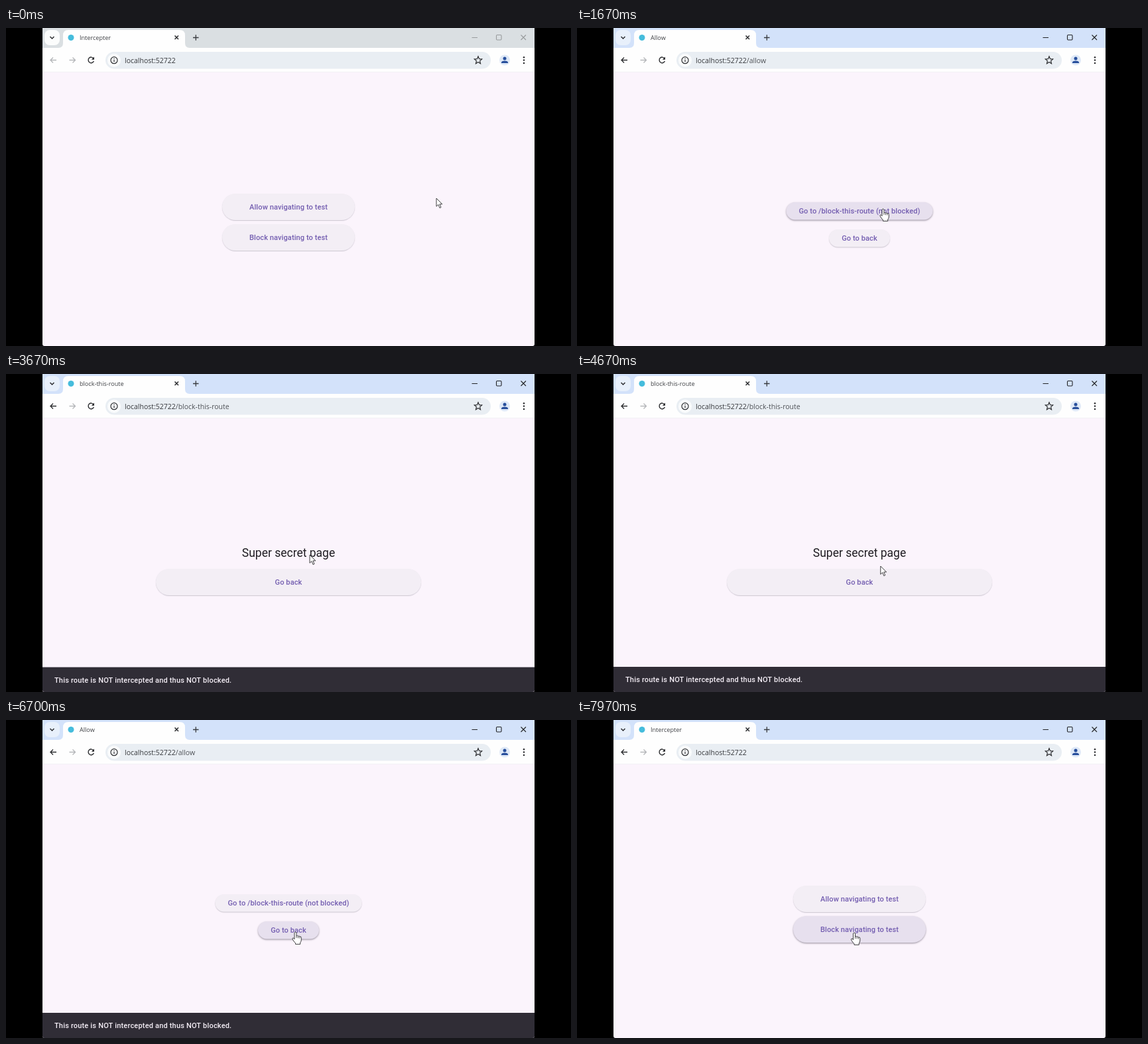
Recreate the animation shown at these times as an HTML page with a canvas. Size 852 by 480 pixels, loop 8000 ms.

```html
<!DOCTYPE html>
<html lang="en">
<head>
<meta charset="utf-8">
<title>Route demo</title>
<style>
html, body { margin: 0; width: 100%; height: 100%; overflow: hidden; background: #000; }
canvas { display: block; width: 852px; height: 480px; }
</style>
</head>
<body>
<canvas id="stage" width="852" height="480"></canvas>
<script>
const ctx = document.getElementById('stage').getContext('2d');
const LOOP = 8000;
const UI = '"Open Sans", "Noto Sans", sans-serif';
const APP = 'Roboto, sans-serif';
const PAPER = '#fbf4fc';
const CHROME = '#fefefe';
const INK = '#2b2c2f';
const FAINT = '#b4b6b9';

// Button: label, x, y, width, height
const pages = {
  home: {
    title: 'Intercepter', path: '',
    buttons: [['Allow navigating to test', 326, 250, 200, 40],
              ['Block navigating to test', 326, 296, 200, 40]]
  },
  allow: {
    title: 'Allow', path: '/allow',
    buttons: [['Go to /block-this-route (not blocked)', 315.5, 263, 221, 26.5],
              ['Go to back', 380, 304, 92, 26.5]]
  },
  secret: {
    title: 'block-this-route', path: '/block-this-route', heading: 'Super secret page',
    buttons: [['Go back', 226, 294, 400, 40]]
  }
};

// Start time, page, scale the page enters from
const visits = [[-1000, 'home', 1], [1000, 'allow', 0.85], [3390, 'secret', 0.85],
                [5900, 'allow', 1.06], [6980, 'home', 1.06]];
const FOCUS_AT = 920;

// Time, x, y of the pointer's hot spot
const path = [[0, 649, 257], [150, 649, 257], [750, 464, 273], [1670, 461.5, 273],
              [2600, 458, 272], [3700, 458, 273], [4300, 458, 274], [5100, 457.5, 310],
              [6000, 457.5, 310], [6600, 436.5, 320], [7200, 436.5, 320],
              [7700, 418, 321], [8000, 418, 321]];

const clamp = v => Math.max(0, Math.min(1, v));
const smooth = v => { v = clamp(v); return v * v * (3 - 2 * v); };
const easeOut = v => 1 - Math.pow(1 - clamp(v), 3);

function visitIndex(t) {
  let i = 0;
  while (i + 1 < visits.length && visits[i + 1][0] <= t) i++;
  return i;
}

function pointer(t) {
  t = Math.max(0, t);
  let i = 0;
  while (i + 2 < path.length && path[i + 1][0] <= t) i++;
  const [t0, x0, y0] = path[i], [t1, x1, y1] = path[i + 1];
  const k = smooth((t - t0) / (t1 - t0));
  return [x0 + (x1 - x0) * k, y0 + (y1 - y0) * k];
}

function hovered(t) {
  const [px, py] = pointer(t);
  return pages[visits[visitIndex(t)][1]].buttons.find(
    ([, x, y, w, h]) => px >= x && px <= x + w && py >= y && py <= y + h);
}

// Hover strength lags behind the pointer
function glow(button, t) {
  let sum = 0;
  for (let k = 0; k < 8; k++) sum += hovered(t - k * 20) === button;
  return sum / 8;
}

function pill(x, y, w, h, r, fill) {
  ctx.beginPath();
  ctx.roundRect(x, y, w, h, r);
  ctx.fillStyle = fill;
  ctx.fill();
}

function disc(x, y, r, fill) {
  ctx.beginPath();
  ctx.arc(x, y, r, 0, 7);
  ctx.fillStyle = fill;
  ctx.fill();
}

function stroke(d, color, width = 1.3) {
  ctx.strokeStyle = color;
  ctx.lineWidth = width;
  ctx.stroke(new Path2D(d));
}

function text(str, x, y, font, color, align = 'left', spacing = 0) {
  ctx.font = font;
  ctx.fillStyle = color;
  ctx.textAlign = align;
  ctx.textBaseline = 'alphabetic';
  ctx.letterSpacing = spacing + 'px';
  ctx.fillText(str, x, y);
}

function mix(a, b, k) {
  return `rgb(${a.map((v, i) => Math.round(v + (b[i] - v) * k))})`;
}

function drawButton(button, t) {
  const [label, x, y, w, h] = button;
  const g = glow(button, t);
  ctx.save();
  ctx.shadowColor = mix([204, 198, 208], [160, 152, 166], g);
  ctx.shadowOffsetY = 0.9 + 0.3 * g;
  ctx.shadowBlur = 1.2 + 1.3 * g;
  pill(x, y, w, h, h / 2, mix([243, 238, 245], [231, 224, 238], g));
  ctx.restore();
  text(label, x + w / 2, y + h / 2 + 4, `500 11.06px ${APP}`, '#735db0', 'center', 0.08);
}

function drawPage(page, t, alpha, scale) {
  ctx.save();
  ctx.globalAlpha = alpha;
  ctx.translate(426, 273);
  ctx.scale(scale, scale);
  ctx.translate(-426, -273);
  ctx.fillStyle = PAPER;
  ctx.fillRect(55, 67, 742, 413);
  if (page.heading) text(page.heading, 426, 276, `17.5px ${APP}`, '#1f1d22', 'center');
  page.buttons.forEach(b => drawButton(b, t));
  ctx.restore();
}

function drawContent(t) {
  const i = visitIndex(t);
  const [start, name, from] = visits[i];
  const k = (t - start) / 300;
  ctx.save();
  ctx.beginPath();
  ctx.rect(55, 67, 742, 413);
  ctx.clip();
  if (k < 1) drawPage(pages[visits[i - 1][1]], t, 1, 1);
  drawPage(pages[name], t, clamp((k - 0.08) / 0.22), from + (1 - from) * easeOut(k));

  const rise = smooth((t - 3420) / 270) * (1 - smooth((t - 7690) / 250));
  if (rise > 0) {
    const y = 480 - 38 * rise;
    ctx.fillStyle = '#302d36';
    ctx.fillRect(55, y, 742, 38);
    text('This route is NOT intercepted and thus NOT blocked.', 73, y + 23,
         `500 11px ${APP}`, '#f5eff7', 'left', 0.18);
  }
  ctx.restore();
}

function drawTabs(page, focused) {
  ctx.fillStyle = focused ? '#d3e2fa' : '#dadfe2';
  ctx.fillRect(55, 0, 742, 30);
  pill(58, 3, 23, 23, 8, focused ? '#e8f0fb' : '#fbfcfc');
  stroke('M66.5 13 L69.5 16 L72.5 13', INK, 1.5);

  ctx.fillStyle = CHROME;
  ctx.fill(new Path2D('M79 30 Q86 30 86 23 V11 Q86 3 94 3 H262 Q270 3 270 11 V23 Q270 30 277 30 Z'));
  disc(98, 14.5, 4.5, '#45bcdc');
  text(page.title, 111, 18, `9.1px ${UI}`, '#3f4145');
  stroke('M254.5 11.5 l5.5 5.5 m0 -5.5 l-5.5 5.5', INK, 1.5);
  stroke('M282 14.5 h8.5 M286.3 10.2 v8.5', '#3a3c40', 1.3);

  const c = focused ? '#222326' : '#989b9d';
  stroke('M702.5 14.5 h8.5 M776.5 10.5 l7.5 7.5 m0 -7.5 l-7.5 7.5', c, 1.1);
  ctx.beginPath();
  ctx.roundRect(739.5, 10.5, 7.5, 7.5, 1.2);
  ctx.stroke();
}

function drawStar(cx, cy, r) {
  ctx.beginPath();
  for (let i = 0; i < 10; i++) {
    const a = -Math.PI / 2 + i * Math.PI / 5;
    const d = i % 2 ? r * 0.45 : r;
    ctx.lineTo(cx + d * Math.cos(a), cy + d * Math.sin(a));
  }
  ctx.closePath();
  ctx.strokeStyle = INK;
  ctx.lineWidth = 1.2;
  ctx.stroke();
}

function drawToolbar(page, canGoBack) {
  ctx.fillStyle = CHROME;
  ctx.fillRect(55, 30, 742, 37);
  ctx.fillStyle = '#f3f1f5';
  ctx.fillRect(55, 66, 742, 1);

  stroke('M76 48.5 h-9 m4 -4 l-4 4 l4 4', canGoBack ? INK : FAINT);
  stroke('M95.5 48.5 h9 m-4 -4 l4 4 l-4 4', FAINT);
  stroke('M132 46 A4.3 4.3 0 1 0 132.4 50', INK, 1.4);
  ctx.fillStyle = INK;
  ctx.fill(new Path2D('M133 43.5 v4.2 h-4.2 Z'));

  pill(150, 36, 581, 25.5, 12.75, '#e9eef3');
  disc(163, 48.7, 10, '#fafcfd');
  ctx.beginPath();
  ctx.arc(163, 48.7, 5, 0, 7);
  ctx.strokeStyle = INK;
  ctx.lineWidth = 1.2;
  ctx.stroke();
  stroke('M163 48 v3.2 M163 45.8 v1.2', INK, 1.2);

  const font = `10.5px ${UI}`;
  text('localhost:52722', 179, 52.5, font, '#35373b');
  const hostWidth = ctx.measureText('localhost:52722').width;
  text(page.path, 179 + hostWidth, 52.5, font, '#4e5156');

  drawStar(712, 48.8, 6);
  disc(752, 48.5, 8, '#dfe9f7');
  disc(752, 46, 2.5, '#284f9c');
  ctx.fill(new Path2D('M747 53 V51.8 Q748 49.5 752 49.5 Q756 49.5 757 51.8 V53 Z'));
  [44.2, 48.6, 53].forEach(y => disc(781, y, 1.25, INK));
}

const ARROW = new Path2D('M0 0 V12.3 L2.9 9.6 L5 14.6 L7 13.7 L4.9 8.9 H8.8 Z');
const HAND = new Path2D('M-1.5 1 Q0 -1 1.5 1 V6 Q3 4.9 4 6.3 Q5.4 5.4 6.4 6.9 Q8.6 6.3 8.8 8.6' +
  ' V12 Q8.7 14.5 7.2 16 V18.4 H0 V16.8 Q-2.6 14.3 -4.5 10.8 Q-4.8 8.7 -3 9 L-1.5 10.7 Z');

function drawPointer(t) {
  const hand = hovered(t);
  const [x, y] = pointer(t);
  const shape = hand ? HAND : ARROW;
  ctx.save();
  ctx.translate(x, y);
  ctx.lineJoin = 'round';
  ctx.lineWidth = 0.9;
  ctx.fillStyle = '#fff';
  ctx.strokeStyle = '#2a2a2c';
  ctx.fill(shape);
  ctx.stroke(shape);
  if (hand) stroke('M1.5 6 v3 M4 6.5 v2.8 M6.4 7 v2.6', '#2a2a2c', 0.8);
  ctx.restore();
}

function draw(t) {
  const i = visitIndex(t);
  const page = pages[visits[i][1]];
  ctx.fillStyle = '#000';
  ctx.fillRect(0, 0, 852, 480);
  ctx.save();
  ctx.beginPath();
  ctx.roundRect(55, 0, 742, 480, [0, 0, 3, 3]);
  ctx.clip();
  drawTabs(page, t >= FOCUS_AT);
  drawToolbar(page, i > 0);
  drawContent(t);
  ctx.restore();
  drawPointer(t);
}

const begin = performance.now();
function frame() {
  draw((performance.now() - begin) % LOOP);
  requestAnimationFrame(frame);
}
frame();
</script>
</body>
</html>
```
